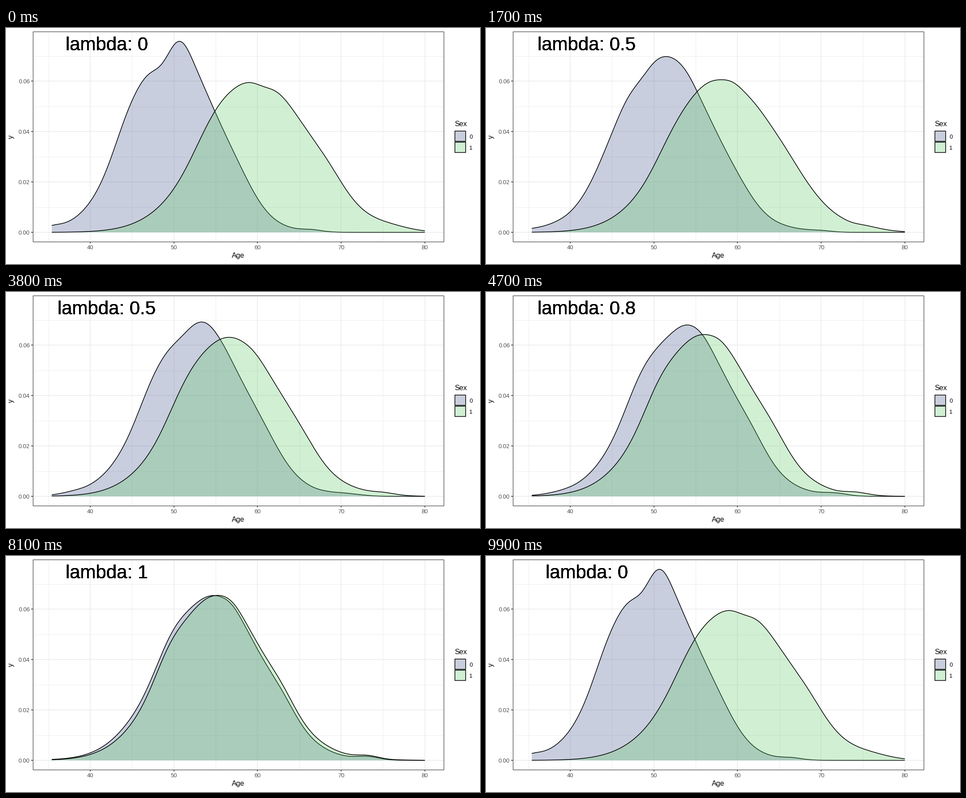
A matplotlib script that plays this animation: 1058x529 px, repeating every 10 s.

```python
import numpy as np
import matplotlib.pyplot as plt
from matplotlib.animation import FuncAnimation
from matplotlib.patches import Rectangle

WIDTH, HEIGHT, DPI = 1058, 529, 64
PX = 72 / DPI
BASE_Y, YEAR, UNIT = 458, 18.67, 5643
LEFT, TOP, RIGHT, BOTTOM = 60, 7.5, 976.5, 479
AGES = np.linspace(35.4, 80, 512)
GRID = np.linspace(25, 95, 2000)
BLUE, GREEN, ALPHA = "#3B528B", "#5DC863", 0.28

plt.rcParams["font.family"] = "Liberation Sans"


def age_x(age):
    return 188 + (age - 40) * YEAR


def density_y(value):
    return BASE_Y - value * UNIT


def bell(height, centre, spread):
    return lambda x: height * np.exp(-0.5 * ((x - centre) / spread) ** 2)


def mixture(*bells):
    return lambda x: np.maximum(sum(b(x) for b in bells), 1e-9)


# Each group is one broad bell (heights in px) with a few local bumps.
group_0 = mixture(bell(415, 49.9, 5.2), bell(31, 44.4, 1.75), bell(-28, 48.5, 1.1),
                  bell(22, 50.9, 1.1), bell(24, 57.7, 2.1), bell(7, 35.3, 1.2),
                  bell(4, 66.5, 1.2))
group_1 = mixture(bell(338, 60.1, 6.3), bell(31, 54.7, 2.4), bell(-11, 60.7, 1.1),
                  bell(19, 68.5, 2), bell(6, 76, 2.2))
shared = mixture(bell(374, 54.9, 5.8), bell(28, 49.3, 1.7), bell(6, 57, 1),
                 bell(21, 63, 1.7), bell(7, 73.2, 1.3))


def cumulative(density):
    total = np.cumsum(density(GRID))
    return total / total[-1]


def repaired(group, lam):
    """Move every quantile of a group the fraction lam towards the shared one."""
    goal = np.interp(cumulative(group), cumulative(shared), GRID)
    x = (1 - lam) * GRID + lam * goal
    height = 1 / ((1 - lam) / group(GRID) + lam / shared(goal))
    return np.interp(AGES, x, height)


LAMBDAS = [0, 0.5, 0.8, 1]
STATES = [[repaired(group, lam) for group in (group_0, group_1)] for lam in LAMBDAS]
# First frame before each move, and the number of steps it takes.
MOVES = [(5, 20), (31, 19), (55, 19), (80, 19)]

fig = plt.figure(figsize=(WIDTH / DPI, HEIGHT / DPI), dpi=DPI, facecolor="white")
ax = fig.add_axes([0, 0, 1, 1])
ax.set(xlim=(0, WIDTH), ylim=(HEIGHT, 0))
ax.axis("off")


def line(x, y, color, width, z):
    return ax.plot(x, y, color=color, lw=width * PX, zorder=z,
                   solid_capstyle="butt", solid_joinstyle="round")[0]


def label(x, y, text, size, color="black", ha="left", **kwargs):
    return ax.text(x, y, text, size=size * PX, color=color, ha=ha,
                   va="baseline", zorder=9, **kwargs)


def draw_panel():
    grid, axis, tick_text = "#EBEBEB", "#333333", "#4D4D4D"
    for age in range(35, 81, 5):
        x, major = age_x(age), age % 10 == 0
        line([x, x], [TOP, BOTTOM], grid, 1.54 if major else 0.9, int(major))
        if major:
            line([x, x], [BOTTOM, BOTTOM + 4], axis, 1.5, 1)
            label(x, 496, str(age), 12.9, tick_text, "center")
    for step in range(8):
        y, major = density_y(step / 100), step % 2 == 0
        line([LEFT, RIGHT], [y, y], grid, 1.54 if major else 0.9, int(major))
        if major:
            line([LEFT - 4, LEFT], [y, y], axis, 1.5, 1)
            label(53.2, y + 4.6, f"{step / 100:.2f}", 12.9, tick_text, "right")
    ax.add_patch(Rectangle((LEFT, TOP), RIGHT - LEFT, BOTTOM - TOP, fill=False,
                           ec=axis, lw=1.1 * PX, zorder=8))
    label(518, 515, "Age", 16, ha="center")
    label(16.3, 244, "y", 16, ha="center", rotation=90, rotation_mode="anchor")


def draw_legend():
    label(1001.3, 220.5, "Sex", 16)
    for name, color, y in (("0", BLUE, 231), ("1", GREEN, 256.2)):
        box = (1002.3, y), 23.4, 23.2
        ax.add_patch(Rectangle(*box, fc=color, alpha=ALPHA, lw=0))
        ax.add_patch(Rectangle(*box, fill=False, ec="black", lw=1.5 * PX))
        label(1034.3, y + 16.5, name, 12.9)


draw_panel()
draw_legend()

xs = age_x(AGES)
fills, outlines = [], []
for z, color in ((2, BLUE), (4, GREEN)):
    fills += ax.fill(xs, xs * 0 + BASE_Y, color=color, alpha=ALPHA, lw=0, zorder=z)
    outlines.append(line(xs, xs * 0 + BASE_Y, "black", 1.54, z + 1))
# Overprinting hardens the letter edges.
titles = [label(225, 50.5, "", 41.9, ha="center") for _ in range(6)]


def blend_at(frame):
    """Return the old state, the new state and the progress between them."""
    old = max(sum(frame >= start for start, _ in MOVES) - 1, 0)
    start, steps = MOVES[old]
    return old, (old + 1) % len(STATES), np.clip((frame - start) / steps, 0, 1)


def update(frame):
    old, new, t = blend_at(frame)
    for fill, outline, a, b in zip(fills, outlines, STATES[old], STATES[new]):
        ys = BASE_Y - ((1 - t) * a + t * b)
        outline.set_ydata(ys)
        fill.set_xy(np.column_stack([np.r_[xs, xs[-1], xs[0]],
                                     np.r_[ys, BASE_Y, BASE_Y]]))
    for title in titles:
        title.set_text(f"lambda: {LAMBDAS[new if t >= 0.5 else old]}")
    return fills + outlines + titles


anim = FuncAnimation(fig, update, frames=100, interval=100, repeat=True,
                     repeat_delay=0, blit=False)
plt.show()
```
